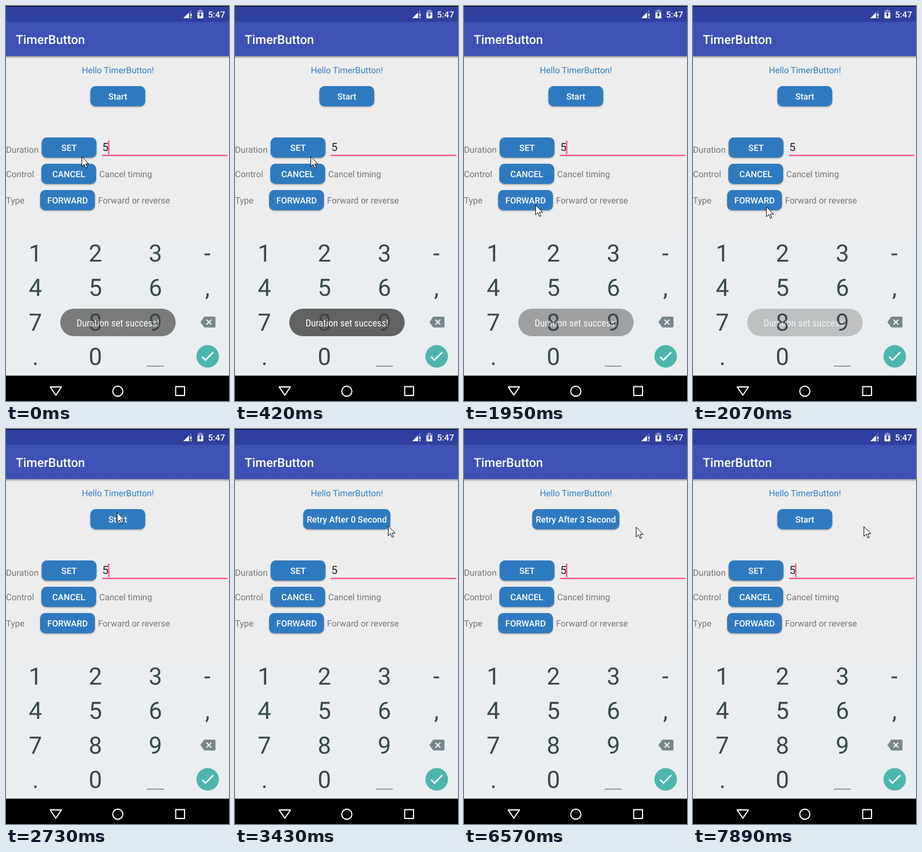
Animation, 366 px wide and 646 px high, one loop 8 s. Source, as an HTML page:

```html
<!DOCTYPE html>
<html lang="en">
<head>
<meta charset="utf-8">
<title>TimerButton</title>
<style>
  html, body { margin: 0; width: 100%; height: 100%; overflow: hidden; background: #000; }
  svg { display: block; width: 366px; height: 646px; font: 14.23px Roboto, sans-serif; text-rendering: geometricPrecision; }
  .mid { text-anchor: middle; }
  .bold { font-weight: 500; fill: #fff; }
  .label { fill: #757575; }
  .key { font-size: 39px; fill: #37474f; text-anchor: middle; }
  .line { fill: none; stroke: #fff; stroke-width: 1.9; stroke-linejoin: round; }
  .toast { font: 16px "Roboto Condensed", Roboto, sans-serif; font-stretch: condensed; fill: #fff; }
</style>
</head>
<body>
<svg viewBox="0 0 366 646">
  <defs>
    <filter id="soft" x="-10%" y="-30%" width="120%" height="180%"><feGaussianBlur stdDeviation=".8"/></filter>
    <linearGradient id="drop" x2="0" y2="1">
      <stop stop-color="#000" stop-opacity=".35"/><stop offset="1" stop-color="#000" stop-opacity="0"/>
    </linearGradient>
  </defs>

  <rect width="366" height="378" fill="#ededed"/>
  <rect y="82" width="366" height="4" fill="url(#drop)"/>
  <rect y="26" width="366" height="56" fill="#3f51b5"/>
  <rect width="366" height="26" fill="#303f9f"/>
  <rect width="366" height="1" fill="#000"/>
  <text class="bold" x="16" y="62" font-size="20.33">TimerButton</text>

  <g fill="#fff">
    <path d="M291 20L304 7V10H301V20Z" opacity=".45"/>
    <path d="M291 20L300 11V20ZM302.5 12H304.5V17H302.5ZM302.5 18.2H304.5V20H302.5Z"/>
    <g transform="translate(307.6 4.4) scale(.95 .72)">
      <path d="M17 4H14V2H10V4H7V9H11.900L13 7V9H17Z" opacity=".4"/>
      <path d="M13 12.500H15L11 20V14.500H9L11.900 9H7V22H17V9H13Z"/>
    </g>
    <text class="bold" x="331.500" y="19">5:47</text>
  </g>

  <text class="mid" x="183.700" y="110" fill="#2f7dc4">Hello TimerButton!</text>
  <g id="buttons"></g>

  <g class="label">
    <text x="0" y="240">Duration</text>
    <text x="0" y="280">Control</text>
    <text x="0" y="323">Type</text>
    <text x="153" y="280">Cancel timing</text>
    <text x="151" y="323">Forward or reverse</text>
  </g>
  <text x="158" y="237" font-size="18.3" fill="#212121">5</text>
  <rect x="157.500" y="243.400" width="206" height="2" fill="#ff4081"/>
  <rect id="caret" x="167.500" y="220" width="2" height="22" fill="#ff4081"/>

  <rect y="377" width="366" height="228" fill="#ebeef0"/>
  <g id="keys"></g>
  <path d="M231 589H259" stroke="#7b888e" stroke-width="1.5"/>
  <path d="M325.500 508H342a1.800 1.800 0 0 1 1.800 1.800V524a1.800 1.800 0 0 1-1.800 1.800H325.500L319 517Z" fill="#78868c"/>
  <path d="M329 513L337 521M337 513L329 521" stroke="#ebeef0" stroke-width="2"/>
  <circle cx="331" cy="573" r="18.500" fill="#4db6ac"/>
  <path transform="translate(331 573) scale(1.14) translate(-12.2 -12.3)" d="M9 16.200L4.800 12L3.400 13.400L9 19L21 7L19.600 5.600Z" fill="#fff"/>

  <rect y="604.500" width="366" height="42" fill="#000"/>
  <path class="line" d="M72.500 623H91L81.800 636.500Z"/>
  <circle class="line" cx="183.500" cy="630" r="8.300"/>
  <rect class="line" x="278.500" y="622.500" width="14.500" height="14.500"/>

  <g id="toast">
    <rect x="89" y="495" width="189.500" height="45" rx="22.500" fill="#444" fill-opacity=".82"/>
    <text class="mid toast" x="183.700" y="523.500">Duration set success!</text>
  </g>
  <path id="cursor" d="M.5 .5V16.500L4.200 13L7 19.200L9.400 18.200L6.700 12.200H11.800Z" fill="#fff" stroke="#111" stroke-linejoin="round"/>
</svg>

<script>
const $ = id => document.getElementById(id);
const LOOP = 8000;
const STEP = 136.5;   // pointer and toast refresh interval
const CLICK = 2845;   // Start is pressed
const SECOND = 1006;  // one countdown tick
const DURATION = 5;

const button = (x, y, w, text) => `
  <rect x="${x}" y="${y + 1.3}" width="${w}" height="33" rx="8.5" fill="#000" opacity=".35" filter="url(#soft)"/>
  <rect x="${x}" y="${y}" width="${w}" height="33" rx="8.5" fill="#2f7abf"/>
  <text class="mid bold" x="${x + w / 2}" y="${y + 22}">${text}</text>`;

$("buttons").innerHTML = '<g id="timer"></g>' +
  button(58.5, 215, 90, "SET") + button(58, 258, 90, "CANCEL") + button(56, 301, 90, "FORWARD");

$("keys").innerHTML = ["123-", "456,", "789", ".0"].map((row, r) =>
  [...row].map((c, i) =>
    `<text class="key" x="${i < 3 ? 48.3 + 98.4 * i : 330.5}" y="${418.2 + 56.2 * r}">${c}</text>`).join("")).join("");

// Pointer stops: [refresh count, x, y]
const stops = [[4, 124, 246], [10, 173, 146], [12, 110, 318], [15, 120, 328], [19, 178, 128],
  [21, 186, 143], [25, 251, 158], [30, 285, 168], [41, 285, 168], [48, 282, 160], [53, 280, 159]];

function pointer(n) {
  const i = stops.findIndex(s => s[0] > n);
  if (i < 1) return stops.at(i).slice(1);
  const a = stops[i - 1], b = stops[i];
  const f = (n - a[0]) / (b[0] - a[0]), ease = f * f * (3 - 2 * f);
  return [1, 2].map(k => Math.round(a[k] + (b[k] - a[k]) * ease));
}

let shown;
function setTimer(text) {
  if (text === shown) return;
  shown = text;
  $("timer").innerHTML = text === "Start" ? button(138.5, 131, 90, text) : button(112, 131, 143, text);
}

function draw(t) {
  const n = Math.floor(t / STEP), held = n * STEP;
  $("cursor").setAttribute("transform", `translate(${pointer(n)})`);
  $("toast").setAttribute("opacity", Math.max(0, Math.min(1, .82 + held / 800, (2245 - held) / 600)));
  $("caret").style.display = t < 150 || (t + 500) % 1000 < 490 ? "" : "none";

  const count = Math.floor((t - CLICK) / SECOND);
  setTimer(count >= 0 && count < DURATION ? `Retry After ${count} Second` : "Start");
}

const start = performance.now();
(function loop() {
  draw((performance.now() - start) % LOOP);
  requestAnimationFrame(loop);
})();
</script>
</body>
</html>
```
